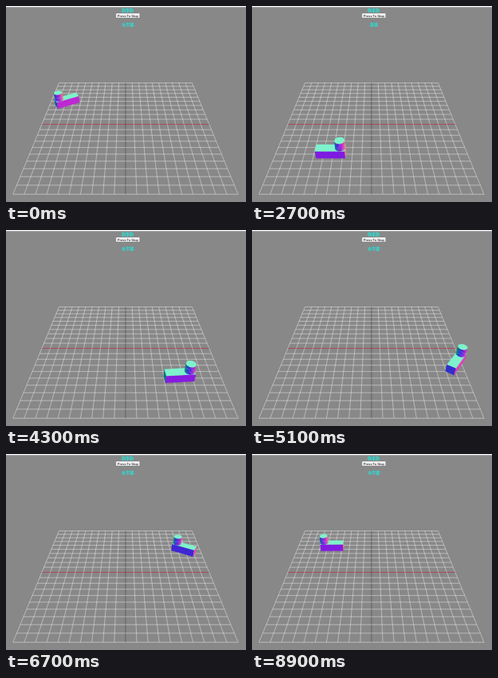
An HTML page that plays this animation: 301 by 246 pixels, repeating every 9000 ms.

```html
<!DOCTYPE html>
<html lang="zh-Hant">
<head>
<meta charset="utf-8">
<style>
  html, body { margin: 0; width: 100%; height: 100%; overflow: hidden; background: #888; }
  svg { display: block; width: 100vw; height: 100vh; }
  text { text-anchor: middle; font-family: "Noto Sans CJK TC", "Noto Sans CJK", sans-serif; font-size: 5px; font-weight: 700; fill: #20e6da; }
  .button { font-family: "Liberation Sans", Arial, sans-serif; font-size: 4.2px; font-weight: 400; fill: #000; }
</style>
</head>
<body>
<svg viewBox="0 0 301 246">
  <rect width="301" height="246" fill="#888"/>
  <rect width="301" height="1.3" fill="#fff"/>
  <g id="grid" stroke-width=".45"></g>
  <g id="car" stroke-width=".15" stroke-linejoin="round"></g>
  <text x="152.5" y="7.2">跑車動</text>
  <rect x="137.8" y="9" width="30" height="6" rx=".8" fill="#f4f4f4" stroke="#666" stroke-width=".4"/>
  <text class="button" x="152.8" y="13.5">Press To Stop</text>
  <text id="label" x="152.7" y="25.2"></text>
</svg>
<script>
const LOOP = 9000, STEP = 100;
const { sin, cos, PI } = Math;

// The camera looks down at the origin; one unit is half the grid.
const SIN = 0.622, COS = 0.783, DISTANCE = 3.05, FOCAL = 320;
const CENTER = [149.9, 148.5];
const EYE = [0, DISTANCE * SIN, DISTANCE * COS];

const grid = document.getElementById('grid');
const car = document.getElementById('car');
const label = document.getElementById('label');

function project([x, y, z]) {
  const scale = FOCAL / (DISTANCE - z * COS - y * SIN);
  return [CENTER[0] + x * scale, CENTER[1] + (z * SIN - y * COS) * scale];
}

// Colour taken from the surface direction as the camera sees it, with stronger green contrast.
function normalColor([x, y, z]) {
  const up = y * COS - z * SIN, toward = y * SIN + z * COS;
  const rgb = [126 + 126 * x, 122 + 153 * up, 126 + 126 * toward];
  return `rgb(${rgb.map(Math.round)})`;
}

function face(points, normal) {
  const facing = normal.reduce((sum, n, i) => sum + n * (EYE[i] - points[0][i]), 0);
  if (facing <= 0) return '';
  const color = normalColor(normal);
  const corners = points.map(p => project(p).map(v => v.toFixed(2))).join(' ');
  return `<polygon points="${corners}" fill="${color}" stroke="${color}"/>`;
}

function gridLine(a, b, color) {
  const [x1, y1] = project(a), [x2, y2] = project(b);
  return `<line x1="${x1}" y1="${y1}" x2="${x2}" y2="${y2}" stroke="${color}"/>`;
}

function drawGrid() {
  let lines = '';
  for (let i = -10; i <= 10; i++) {
    const k = i / 10;
    if (i) lines += gridLine([-1, 0, k], [1, 0, k], '#f4f4f4');
    lines += gridLine([k, 0, -1], [k, 0, 1], i ? '#f4f4f4' : '#333');
  }
  grid.innerHTML = lines + gridLine([-1, 0, 0], [1, 0, 0], '#d80020');
}

// The track is two straights joined by half circles of radius R.
const R = 0.51, HALF = 0.515;
const arc = (a, side, name) => ({
  x: side * (HALF + R * sin(a)), z: side * R * cos(a),
  dx: side * cos(a), dz: -side * sin(a), name
});
const leftArc = a => arc(a, -1, '左半圓');
const rightArc = a => arc(a, 1, '右半圓');
const straight = (u, side) => ({ x: side * HALF * (2 * u - 1), z: side * R, dx: side, dz: 0, name: '直線' });

function poseAt(t) {
  const part = (from, to) => (t - from) / (to - from);
  if (t < 2540) return leftArc(PI * (1 + 5 * part(0, 2540)) / 6);
  if (t < 4230) return straight(part(2540, 4230), 1);
  if (t < 7190) return rightArc(PI * part(4230, 7190));
  if (t < 8880) return straight(part(7190, 8880), -1);
  return leftArc(PI * part(8880, 11840));
}

function drawCar({ x, z, dx, dz }) {
  const turn = (a, y, b) => [a * dx - b * dz, y, a * dz + b * dx];
  const at = (a, y, b) => {
    const [px, , pz] = turn(a, y, b);
    return [x + px, y, z + pz];
  };
  const L = 0.15, W = 0.05, H = 0.1, TOP = 0.2;
  let out = '';
  for (const s of [-1, 1]) {
    out += face([at(-L, 0, s * W), at(L, 0, s * W), at(L, H, s * W), at(-L, H, s * W)], turn(0, 0, s));
    out += face([at(s * L, 0, -W), at(s * L, 0, W), at(s * L, H, W), at(s * L, H, -W)], turn(s, 0, 0));
  }
  out += face([at(-L, H, -W), at(L, H, -W), at(L, H, W), at(-L, H, W)], [0, 1, 0]);

  const segments = 32, rim = [];
  const ring = (i, y) => {
    const a = 2 * PI * i / segments;
    return at(0.1 + W * cos(a), y, W * sin(a));
  };
  for (let i = 0; i < segments; i++) {
    const a = 2 * PI * (i + 0.5) / segments;
    out += face([ring(i, H), ring(i + 1, H), ring(i + 1, TOP), ring(i, TOP)], turn(cos(a), 0, sin(a)));
    rim.push(ring(i, TOP));
  }
  car.innerHTML = out + face(rim, [0, 1, 0]);
}

let start, shown;
function tick(now) {
  start ??= now;
  const t = Math.floor((now - start) % LOOP / STEP) * STEP;
  if (t !== shown) {
    const pose = poseAt(t);
    drawCar(pose);
    label.textContent = pose.name;
    shown = t;
  }
  requestAnimationFrame(tick);
}

drawGrid();
requestAnimationFrame(tick);
</script>
</body>
</html>
```
